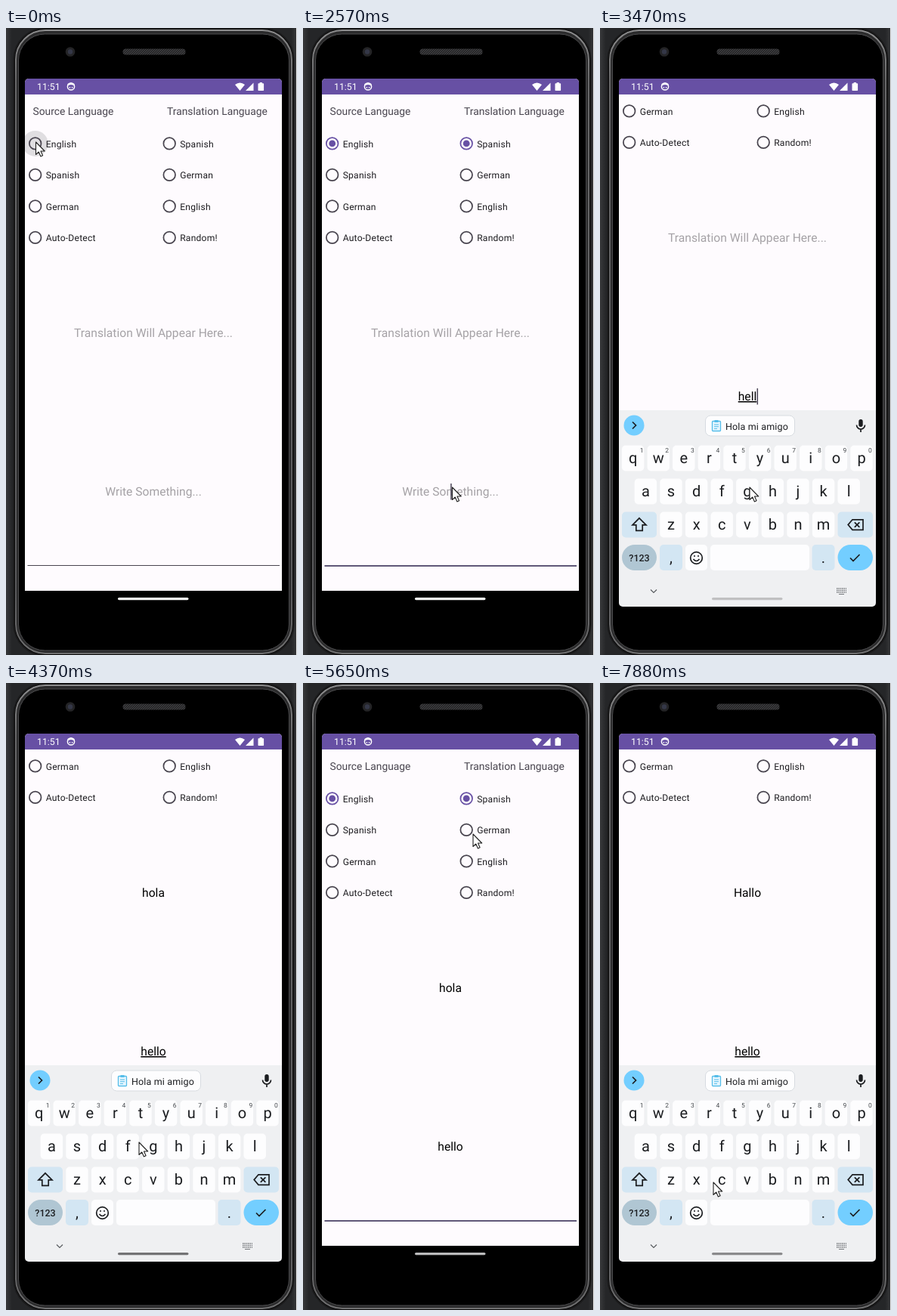
Animation, 385 px wide and 830 px high, one loop 8 s. Source, as an HTML page:

```html
<!DOCTYPE html>
<html lang="en">
<head>
<meta charset="utf-8">
<title>Translator app</title>
<style>
  html, body { margin: 0; width: 100%; height: 100%; overflow: hidden; background: #2f2f31; }
  svg { display: block; width: 385px; height: 830px; font-family: Roboto, sans-serif; text-rendering: geometricPrecision; }
  .label { font-size: 13.84px; fill: #49454f; }
  .option { font-size: 12.1px; letter-spacing: .22px; fill: #1c1b1f; }
  .field { font-size: 15.65px; text-anchor: middle; }
  .key { font-size: 20px; text-anchor: middle; fill: #1b1d20; }
  .digit { font-size: 8.5px; text-anchor: middle; fill: #44484c; }
  .icon { fill: none; stroke: #1b1d20; stroke-width: 1.7; }
</style>
</head>
<body>
<svg viewBox="0 0 385 830">
  <defs>
    <linearGradient id="backdrop">
      <stop stop-color="#38393b"/><stop offset=".02" stop-color="#252628"/>
      <stop offset=".98" stop-color="#252628"/><stop offset="1" stop-color="#38393b"/>
    </linearGradient>
    <linearGradient id="rim" x2="0" y2="1">
      <stop stop-color="#8d8d8e"/><stop offset=".08" stop-color="#69696a"/>
      <stop offset=".9" stop-color="#5a5a5c"/><stop offset="1" stop-color="#707071"/>
    </linearGradient>
    <pattern id="mesh" width="3" height="3" patternUnits="userSpaceOnUse">
      <rect width="3" height="3" fill="#252527"/><path d="M0 3L3 0" stroke="#4b4b4d" stroke-width=".9"/>
    </pattern>
    <clipPath id="screen"><rect x="25" y="67" width="340" height="699" rx="5"/></clipPath>
    <clipPath id="page"><rect x="25" y="88" width="340" height="657"/></clipPath>
  </defs>

  <!-- Phone body -->
  <rect width="385" height="830" fill="url(#backdrop)"/>
  <rect x="384" width="1" height="830" fill="#f2f2f2"/>
  <g fill="#000">
    <rect x="10.5" y=".5" width="370" height="830" rx="41" stroke="#1a1a1b" stroke-width="2"/>
    <rect x="13" y="3" width="365" height="825" rx="39" fill="#2b2b2c" stroke="url(#rim)" stroke-width="2"/>
    <rect x="16.5" y="8" width="358" height="816" rx="35" stroke="#4c4c4e"/>
  </g>
  <circle cx="85" cy="31.5" r="6.3" fill="#242426"/>
  <circle cx="85" cy="31.5" r="3.2" fill="#343747"/>
  <rect x="154.5" y="27.5" width="83" height="8" rx="4" fill="url(#mesh)"/>

  <g clip-path="url(#screen)">
    <rect x="25" y="67" width="340" height="678" fill="#fefbfe"/>
    <g clip-path="url(#page)"><g id="content">
      <text class="label" x="35.5" y="115">Source Language</text>
      <text class="label" x="213" y="115">Translation Language</text>
      <g id="options"></g>
      <text id="result" class="field" x="195" y="409"></text>
      <text id="input" class="field" x="195" y="619"></text>
      <rect id="underline" x="28.5" width="333.5"/>
      <rect id="caret" y="603" width="1.5" height="21.5" fill="#4b4558"/>
      <path id="handle" d="M212.7 624.5l5.9 5.6a8.4 8.4 0 1 1-11.8 0z" fill="#655b7c"/>
    </g></g>

    <rect x="25" y="67" width="340" height="21" fill="#6750a4"/>
    <g fill="#fff">
      <text x="41" y="82" font-size="12.3">11:51</text>
      <circle cx="86" cy="77.5" r="4.6" fill="none" stroke="#fff" stroke-width="1.5"/>
      <path d="M81.500 76.500q4.500-3 9 0v-2.500q-4.500-3.500-9 0zM83.700 78h1.400v1.400h-1.400zM86.900 78h1.400v1.400h-1.400z"/>
      <path d="M303 75q6.500-5 13 0l-6.500 8zM327.500 72.500v10.500H317zM333.500 74q0-.8.8-.8h1.400V72h3.200v1.200h1.400q.8 0 .8.8v8.200q0 .8-.8.8h-6q-.8 0-.8-.8z"/>
    </g>

    <g id="keyboard">
      <rect x="25" y="506" width="340" height="262" fill="#eff0f2"/>
      <circle cx="45" cy="526" r="13.500" fill="#73ceff"/>
      <path class="icon" d="M43 521.500l4.500 4.500-4.500 4.500"/>
      <rect x="139.500" y="513" width="118" height="27" rx="7" fill="#fdfdfe" stroke="#d7dbe0"/>
      <g fill="none" stroke="#55bde9" stroke-width="1.3">
        <rect x="148.500" y="520.500" width="11" height="13" rx="1" fill="#e6f6ff"/>
        <path d="M151.500 520.500h5" stroke-width="3"/>
        <path d="M151 525h6M151 527.700h6M151 530.400h4" stroke-width="1"/>
      </g>
      <text x="166" y="531.500" font-size="12.500" letter-spacing=".15" fill="#1b1d20">Hola mi amigo</text>
      <rect x="342.300" y="518" width="5.400" height="10" rx="2.700" fill="#1b1d20"/>
      <path class="icon" d="M339.500 525.500a5.500 5.500 0 0 0 11 0M345 531v4"/>
      <g id="keys"></g>
      <path class="icon" d="M52 648.800l9 9h-4.800v7.500h-8.400v-7.500h-4.800z"/>
      <path class="icon" d="M334 650.800h14v13.500h-14l-5.800-6.700zM336.800 654.300l6.600 6.600M343.400 654.300l-6.600 6.600"/>
      <circle class="icon" cx="127.500" cy="701.500" r="7.800"/>
      <path class="icon" d="M123.500 703q4 5 8 0M124 699h2M129 699h2"/>
      <path class="icon" d="M331 701.500l4 4 8.500-8.500"/>
      <path d="M67 743.500l4 4 4-4" fill="none" stroke="#5b5e62" stroke-width="1.200"/>
      <path d="M313 742h13M313 744.500h13M313 747h13" stroke="#74777b" stroke-width="1.300" stroke-dasharray="1.500 .9"/>
      <path d="M316 749.500h7" stroke="#74777b"/>
    </g>
    <rect id="pill" x="148" y="754" width="93.500" height="3.200" rx="1.600"/>
  </g>
  <path id="pointer" d="M0 0V16.500L3.800 13 6.400 19 9.100 17.800 6.500 12H11.700Z" fill="#fff" stroke="#222" stroke-width="1.100" stroke-linejoin="round"/>
</svg>

<script>
const LOOP = 8000;
const $ = id => document.getElementById(id);
const set = (el, attrs) => { for (const k in attrs) el.setAttribute(k, attrs[k]); };
const add = (parent, tag, attrs, text = "") => {
  const el = document.createElementNS("http://www.w3.org/2000/svg", tag);
  set(el, attrs);
  el.textContent = text;
  return parent.appendChild(el);
};
const clamp = v => Math.max(0, Math.min(1, v));
const ramp = (t, start, end) => clamp((t - start) / (end - start));
const during = (t, ...spans) => spans.some(([a, b]) => t >= a && t < b);
const mix = (a, b, p) => `rgb(${a.map((v, i) => Math.round(v + (b[i] - v) * p))})`;
// Latest row whose time has been reached
const held = (rows, t) => rows.findLast(row => row[0] <= t);

function makeOption(name, x, row) {
  const cx = x, cy = 152.9 + row * 41.5, g = $("options");
  const ripple = add(g, "circle", { cx, cy, r: 17, fill: "#1c1b1f", opacity: 0 });
  const ring = add(g, "circle", { cx, cy, r: 7.8, fill: "none", "stroke-width": 1.75 });
  const dot = add(g, "circle", { cx, cy, fill: "#6750a4" });
  add(g, "text", { class: "option", x: x + 14, y: cy + 4.6 }, name);
  return {
    select(p) {
      set(ring, { stroke: mix([73, 69, 79], [103, 80, 164], p) });
      set(dot, { r: 4.4 * p });
    },
    press(r, opacity) { set(ripple, { r, opacity }); }
  };
}
const column = (x, names) => names.map((name, row) => makeOption(name, x, row));
const sources = column(38.7, ["English", "Spanish", "German", "Auto-Detect"]);
const targets = column(216.2, ["Spanish", "German", "English", "Random!"]);
[...sources, ...targets].forEach(option => option.select(0));

const WHITE = "#fdfdfe", PALE = "#d3e6f3";
function makeKey(x, y, width, fill, label = "", rx = 5) {
  add($("keys"), "rect", { x, y, width, height: 34, rx, fill });
  add($("keys"), "text", { class: "key", x: x + width / 2, y: y + 23.5 }, label);
}
["qwertyuiop", "asdfghjkl", "zxcvbnm"].forEach((letters, row) => {
  const firstX = [43.6, 60.4, 94][row];
  [...letters].forEach((letter, i) => {
    const x = firstX + i * 33.6;
    makeKey(x - 14.7, 552.5 + row * 44, 29.4, WHITE, letter);
    if (row === 0) add($("keys"), "text", { class: "digit", x: x + 11.5, y: 562 }, (i + 1) % 10);
  });
});
makeKey(29, 640.5, 46, PALE);
makeKey(314.5, 640.5, 46.5, PALE);
makeKey(29, 684, 46, "#b0c6d3", "", 17);
add($("keys"), "text", { x: 52, y: 706, "font-size": 12.5, "font-weight": 500, "text-anchor": "middle", fill: "#1b1d20" }, "?123");
makeKey(79, 684, 30, PALE, ",");
makeKey(113, 684, 29, WHITE);
makeKey(146, 684, 131, WHITE);
makeKey(280.5, 684, 30, PALE, ".");
makeKey(314.5, 684, 46.5, "#73ceff", "", 17);

// time, x, y
const pointerPath = [
  [0, 39.5, 151], [530, 164, 150.5], [680, 239, 150], [800, 234, 152], [950, 229, 152],
  [1100, 227, 150], [2030, 220, 577], [2180, 212, 638], [2330, 200, 612], [2450, 197.5, 608],
  [2840, 198, 608], [4370, 176, 608], [4490, 120, 680], [4610, 66, 742], [4730, 62, 751],
  [4870, 66, 762], [5260, 110, 660], [5380, 200, 480], [5510, 257, 300], [5650, 225, 200],
  [5800, 221, 195], [6160, 259, 330], [6310, 240, 668], [6430, 235, 613],
  [7760, 190, 645], [7880, 150, 661]
];
// time, vertical offset, opacity, page scroll
const keyboardPath = [
  [0, 270, 0, 0], [2690, 144, .33, 0], [2840, 1.3, 1, 125], [2960, 0, 1, 126],
  [4870, 4, 1, 126], [4990, 45, .8, 0], [5110, 130, .4, 0], [5260, 270, 0, 0],
  [6790, 144, .33, 0], [6910, 6, 1, 122], [7030, 0, 1, 126]
];

function showText(el, text, hint, underlined) {
  el.textContent = text || hint;
  set(el, { fill: text ? "#000" : "#a5a2a6", "text-decoration": underlined ? "underline" : "none" });
}

function draw(t) {
  const [, x, y] = held(pointerPath, t);
  set($("pointer"), { transform: `translate(${x} ${y})` });

  sources[0].select(ramp(t, 640, 1100));
  sources[0].press(17, .13 * (1 - ramp(t, 600, 900)));
  const toGerman = ramp(t, 5900, 6250);
  targets[0].select(ramp(t, 1950, 2300) * (1 - toGerman));
  targets[0].press(12, during(t, [1880, 2030]) ? .08 : 0);
  targets[1].select(toGerman);
  targets[1].press(14, during(t, [5800, 6040]) ? .08 : 0);

  const [, offset, opacity, scroll] = held(keyboardPath, t);
  set($("keyboard"), { transform: `translate(0 ${offset})`, opacity });
  set($("content"), { transform: `translate(0 ${-scroll})` });

  const typed = "hello".slice(0, Math.max(0, Math.floor((t - 3110) / 120) + 1));
  const translated = t < 3830 ? "" : t < 7520 ? "hola" : "Hallo";
  showText($("result"), translated, "Translation Will Appear Here...", false);
  showText($("input"), typed, "Write Something...", typed && during(t, [0, 4990], [6790, LOOP]));

  const focused = t >= 2450;
  set($("underline"), focused
    ? { y: 711, height: 2, fill: "#605878" }
    : { y: 711, height: 1, fill: "#49454f" });
  const caretOn = during(t, [2450, 4230], [4730, 4990], [6790, 7760]);
  const caretX = typed ? 195 + $("input").getComputedTextLength() / 2 + .3 : 195.2;
  set($("caret"), { x: caretX, opacity: +caretOn });
  set($("handle"), { opacity: +during(t, [6790, 6910]) });

  const dimmed = t < 5000 ? ramp(t, 2960, 4090)
    : t < 6500 ? 1 - ramp(t, 5110, 6160) : ramp(t, 7030, 8050);
  set($("pill"), {
    fill: mix([255, 255, 255], [115, 115, 117], dimmed),
    opacity: during(t, [2840, 2960], [6910, 7030]) ? 0 : 1
  });
}

function tick(now) {
  draw(now % LOOP);
  requestAnimationFrame(tick);
}
draw(0);
requestAnimationFrame(tick);
</script>
</body>
</html>
```
